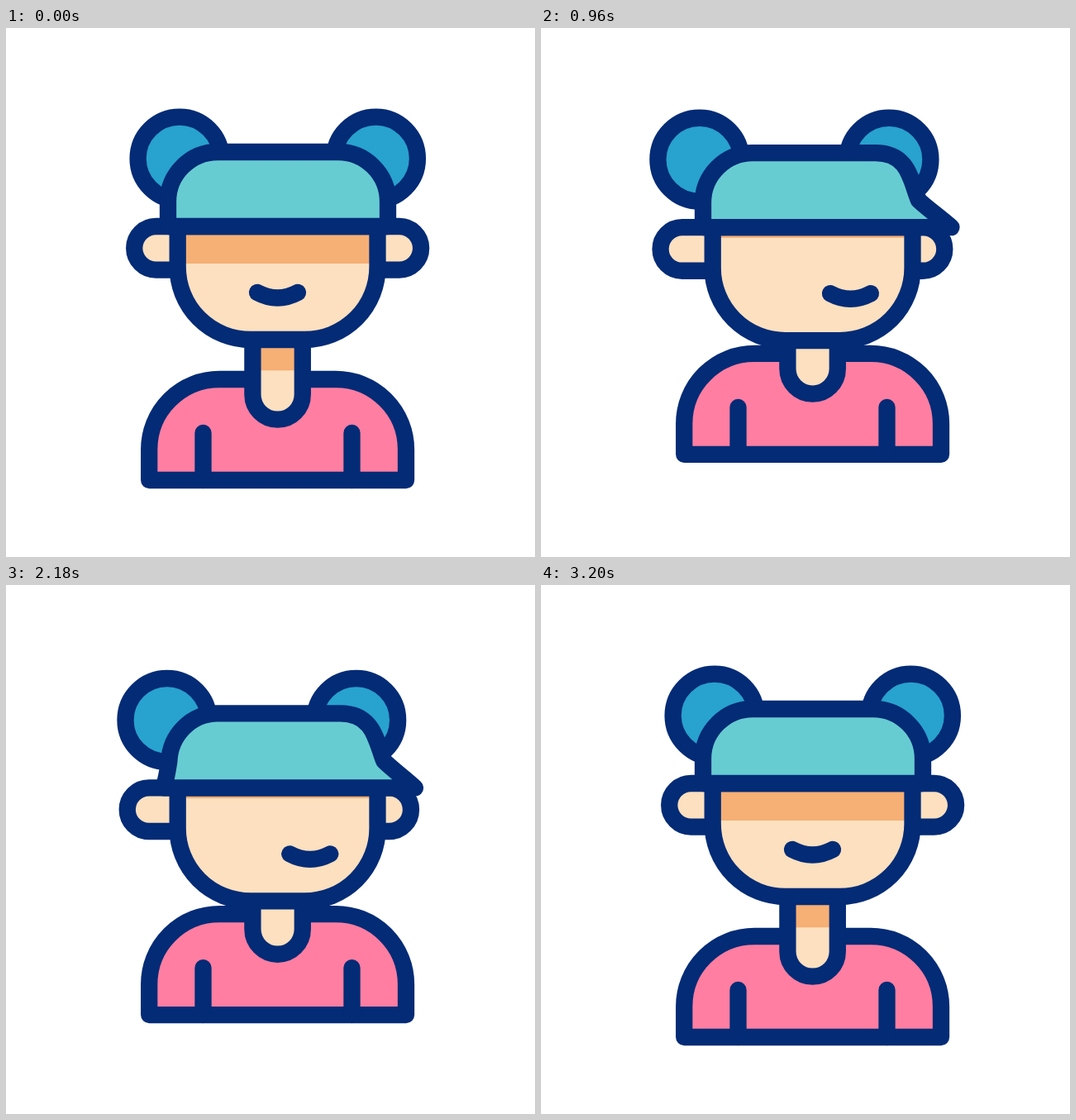
Recreate the animation shown at these times as an HTML page with a canvas. Size 640x640 px, loop 3.42 s.

```html
<!DOCTYPE html>
<html lang="en">
<head>
<meta charset="utf-8">
<title>Girl with hair buns looking around</title>
<style>
  html, body { margin: 0; width: 100%; height: 100%; overflow: hidden; background: #fff; }
  canvas { display: block; width: 100vmin; height: 100vmin; }
</style>
</head>
<body>
<canvas id="stage" width="640" height="640"></canvas>
<script>
const ctx = document.getElementById('stage').getContext('2d');
const LOOP = 3420, STEP = 20;
const INK = '#032b76', SKIN = '#fce0bf', SHADE = '#f6af74';
const SHIRT = '#ff7ea1', HAIR = '#67ccd1', BUN = '#28a2cf';

// Head poses. Sides of the hair run from the brim tip up to the crown.
const REST = {
  mouth: 0, ears: [0, 0], buns: [0, 0],
  left: [196, 240, 196, 230, 196, 220, 196, 210, 196, 177, 223, 150, 256, 150],
  right: [462, 240, 462, 230, 462, 220, 462, 210, 462, 177, 435, 150, 402, 150]
};
const RIGHT = {
  mouth: 50, ears: [-11.6, -15], buns: [-19.8, -28.8],
  left: REST.left,
  right: [499.5, 240, 485, 228, 468, 217, 456.5, 207, 446, 186, 447, 150, 405, 150]
};
const LEFT = {
  mouth: -39, ears: [14.4, 8.7], buns: [19, 13.2],
  left: [150.5, 240, 178, 236, 192, 218, 207, 193, 217, 175, 228, 150, 256, 150],
  right: REST.right
};
const KEYS = [
  [615, REST], [1033, RIGHT], [1600, LEFT], [2050, RIGHT], [2650, LEFT], [2867, REST]
];

function ease(t, from, to) {
  const u = Math.min(1, Math.max(0, (t - from) / (to - from)));
  return u * u * (3 - 2 * u);
}

function mix(a, b, k) {
  return Array.isArray(a) ? a.map((v, i) => mix(v, b[i], k)) : a + (b - a) * k;
}

function poseAt(t) {
  let i = 0;
  while (i < KEYS.length - 2 && t >= KEYS[i + 1][0]) i++;
  const [t0, a] = KEYS[i], [t1, b] = KEYS[i + 1];
  const k = ease(t, t0, t1), pose = {};
  for (const name in a) pose[name] = mix(a[name], b[name], k);
  return pose;
}

function shape(path, fill) {
  if (fill) {
    ctx.fillStyle = fill;
    ctx.fill(path);
  }
  ctx.stroke(path);
}

function rect(x, y, w, h, fill) {
  ctx.fillStyle = fill;
  ctx.fillRect(x, y, w, h);
}

const shirt = new Path2D('M173.2 547V510A85 85 0 0 1 258.2 425H399A85 85 0 0 1 484 510V547Z');
const arms = new Path2D('M238.5 490V547M418.5 490V547');
const neck = new Path2D('M298.4 350V443.5A30.2 30.2 0 0 0 358.8 443.5V350');
const face = new Path2D('M207.7 240V289A88 88 0 0 0 295.7 377H361.5A88 88 0 0 0 449.5 289V240Z');
const mouth = new Path2D('M304 320Q328.5 333 353 320');

function drawBody(dy) {
  ctx.save();
  ctx.translate(0, dy);
  shape(shirt, SHIRT);
  shape(arms);
  ctx.fillStyle = SKIN;
  ctx.fill(neck);
  rect(298.4, 350, 60.4, 64.3, SHADE);
  ctx.stroke(neck);
  ctx.restore();
}

function drawBun(x) {
  const p = new Path2D();
  p.arc(x, 158, 50.4, 0, 7);
  shape(p, BUN);
}

function drawEar(x, side) {
  const p = new Path2D(), root = side < 0 ? 207.7 : 449.5;
  p.moveTo(root, 240);
  p.lineTo(x, 240);
  p.arc(x, 266.3, 26.3, -Math.PI / 2, Math.PI / 2, side < 0);
  p.lineTo(root, 292.6);
  shape(p, SKIN);
}

function drawHair(l, r) {
  const p = new Path2D();
  p.moveTo(l[0], l[1]);
  p.bezierCurveTo(...l.slice(2, 8));
  p.bezierCurveTo(...l.slice(8));
  p.lineTo(r[12], r[13]);
  p.bezierCurveTo(r[10], r[11], r[8], r[9], r[6], r[7]);
  p.bezierCurveTo(r[4], r[5], r[2], r[3], r[0], r[1]);
  p.closePath();
  shape(p, HAIR);
}

function drawHead(dy, shadeEnd, pose) {
  ctx.save();
  ctx.translate(0, dy);
  drawBun(210 + pose.buns[0]);
  drawBun(447.5 + pose.buns[1]);
  drawEar(181.5 + pose.ears[0], -1);
  drawEar(475.8 + pose.ears[1], 1);
  ctx.fillStyle = SKIN;
  ctx.fill(face);
  rect(207.7, 240, 241.8, shadeEnd - 240, SHADE);
  ctx.stroke(face);
  drawHair(pose.left, pose.right);
  ctx.translate(pose.mouth, 0);
  ctx.stroke(mouth);
  ctx.restore();
}

function draw(t) {
  const lift = -51.5 * ease(t, 200, 1533) * (1 - ease(t, 1533, 2867));
  const sink = 32.3 * ease(t, 200, 533) * (1 - ease(t, 2867, 3200));
  rect(0, 0, 640, 640, '#fff');
  ctx.strokeStyle = INK;
  ctx.lineWidth = 20.3;
  ctx.lineCap = ctx.lineJoin = 'round';
  drawBody(lift);
  drawHead(lift + sink, 285 - sink, poseAt(t));
}

const start = performance.now();
function frame() {
  const t = (performance.now() - start) % LOOP;
  draw(Math.floor(t / STEP) * STEP);
  requestAnimationFrame(frame);
}
frame();
</script>
</body>
</html>
```
